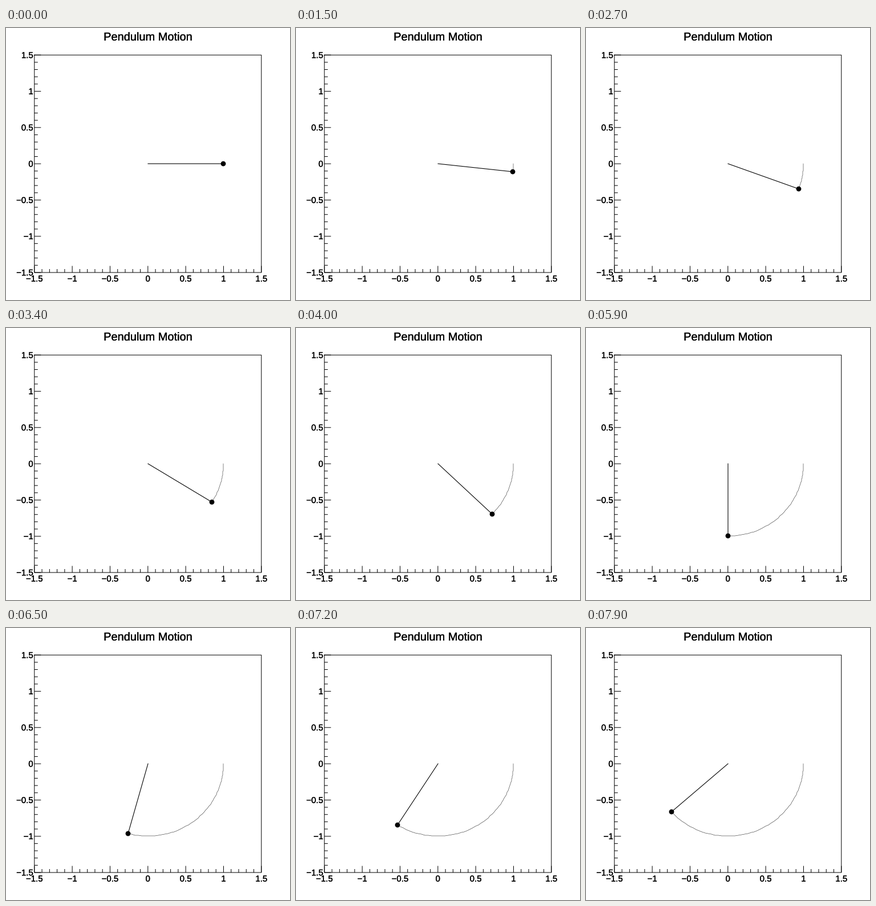
Write a matplotlib script that moves like this. It is 498 px wide and 475 px high and loops after 8 s.

```python
import math

import matplotlib.pyplot as plt
from matplotlib.animation import FuncAnimation
from matplotlib.patches import Circle
from matplotlib.patheffects import withStroke

W, H, DPI = 498, 475, 64
PT = 72 / DPI                      # points per pixel
LEFT, RIGHT, TOP, BOTTOM = 49.8, 447.8, 47.2, 427.0
PIVOT_X, PIVOT_Y = 249, 237
UNIT_X, UNIT_Y = 132.3, 126.5
FRAMES, INTERVAL = 80, 100
GRAVITY, STEP = 9.81, 0.01

plt.rcParams["font.family"] = "Liberation Sans"
plt.rcParams["path.snap"] = False
fig = plt.figure(figsize=(W / DPI, H / DPI), dpi=DPI, facecolor="white")
ax = fig.add_axes([0, 0, 1, 1])
ax.set_xlim(0, W)
ax.set_ylim(H, 0)
ax.axis("off")


def line(xs, ys, width=1.0, color="black", **kw):
    return ax.plot(xs, ys, color=color, lw=width * PT, **kw)[0]


def label(x, y, text, size, ha="center"):
    # The thin outline gives the text its slightly heavier weight.
    ax.text(x, y, text, fontsize=size * PT, ha=ha, va="baseline",
            path_effects=[withStroke(linewidth=0.3 * PT, foreground="black")])


def draw_axes():
    line([LEFT, RIGHT, RIGHT, LEFT, LEFT], [TOP, TOP, BOTTOM, BOTTOM, TOP],
         solid_joinstyle="miter")
    for i in range(31):
        x = LEFT + (RIGHT - LEFT) * i / 30
        y = BOTTOM - (BOTTOM - TOP) * i / 30
        major = i % 5 == 0
        size = 11.5 if major else 6
        line([x, x], [BOTTOM, BOTTOM - size], solid_capstyle="butt")
        line([LEFT, LEFT + size], [y, y], solid_capstyle="butt")
        if major:
            text = f"{(i - 15) / 10:g}".replace("-", "\u2212")
            label(x, 442.7, text, 15)
            label(47.8, y + 5.2, text, 15, "right")
    label(248.7, 21.8, "Pendulum Motion", 20)


def swing():
    """Pixel position of the bob at each step, released from horizontal."""
    angle, speed = 0.0, 0.0
    points = []
    for _ in range(FRAMES):
        x = math.floor(PIVOT_X + UNIT_X * math.cos(angle) + 0.5)
        y = math.floor(PIVOT_Y + UNIT_Y * math.sin(angle) + 0.5)
        points.append((x, y))
        pull = GRAVITY * math.cos(angle)
        angle += speed * STEP + pull * STEP ** 2 / 2
        speed += pull * STEP
    return points


draw_axes()
path = swing()
trail = line([], [], 0.65, "#444444")
rod = line([], [], 1.1)
bob = ax.add_patch(Circle((0, 0), 4.4, color="black", lw=0, zorder=5))


def update(n):
    trail.set_data(*zip(*path[:n + 1]))
    x, y = path[n]
    rod.set_data([PIVOT_X, x], [PIVOT_Y, y])
    bob.center = (x, y)
    return trail, rod, bob


anim = FuncAnimation(fig, update, frames=FRAMES, interval=INTERVAL,
                     repeat=True, repeat_delay=0)
plt.show()
```
